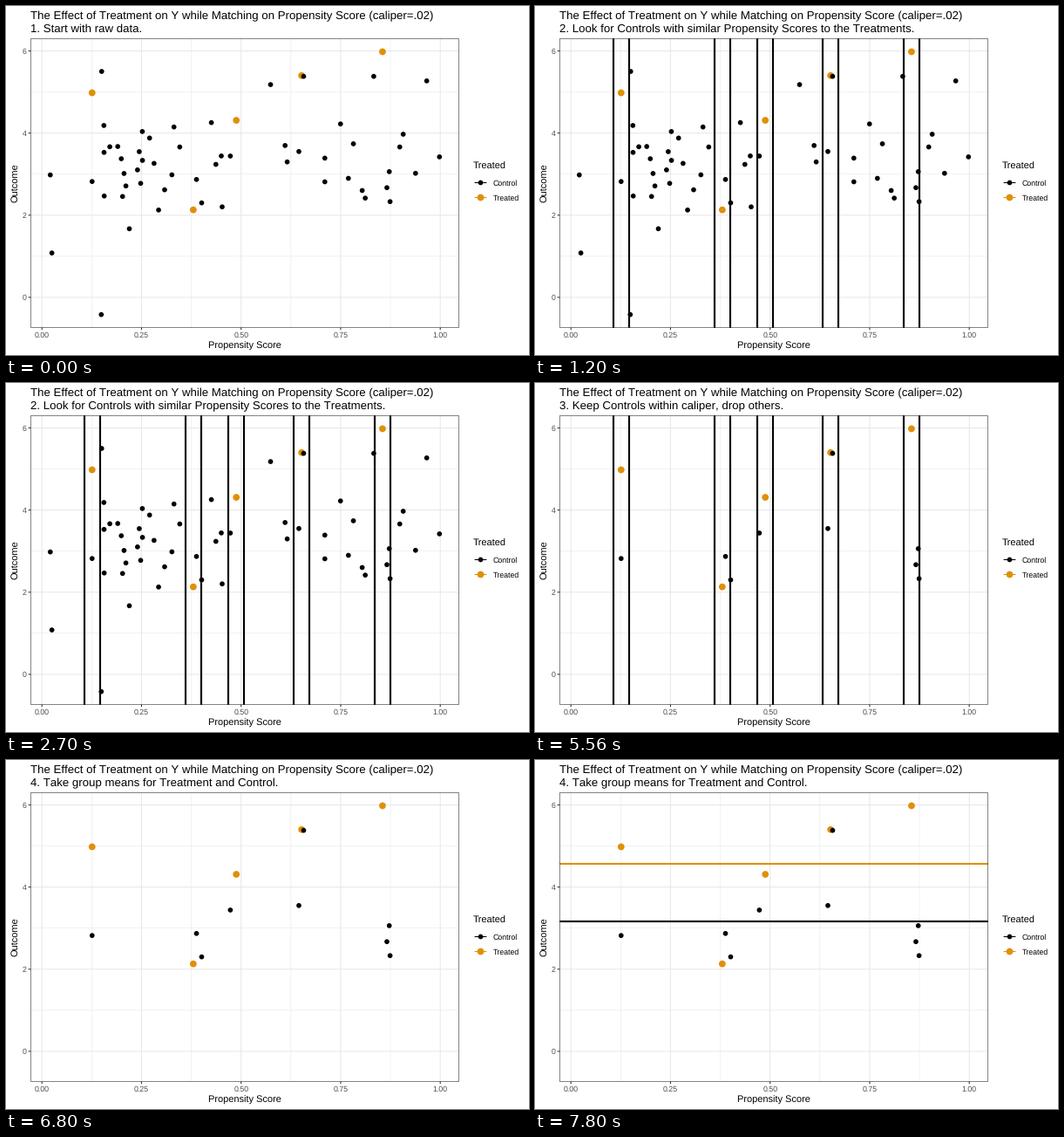
A matplotlib script that plays this animation: 600x400 px, repeating every 8000 ms.

```python
import math
import random

import matplotlib.pyplot as plt
from matplotlib.animation import FuncAnimation
from matplotlib.collections import PatchCollection
from matplotlib.patches import Circle

W, H, DPI = 600, 400, 100
PX = 72 / DPI                      # one pixel in points
STEP, LOOP = 100, 8000             # ms

LEFT, RIGHT, TOP, BOTTOM = 28.4, 519.6, 37.4, 368.5
X0, X_UNIT = 41.2, 457             # score 0 and one unit of score
Y0, Y_UNIT = 333.9, 47.07          # outcome 0 and one unit of outcome
CALIPER = 0.02

ORANGE, BLACK = "#e09008", "black"
GRID, FRAME, TICK_TEXT = "#e8e8e8", "#333333", "#4d4d4d"
THIN, THICK = 1.07, 2.13
R_CONTROL, R_TREATED = 2.84, 3.9

# (score, outcome)
TREATED = [(.126, 4.98), (.380, 2.13), (.488, 4.31), (.652, 5.40), (.855, 5.98)]
MATCHED = [(.126, 2.82), (.388, 2.87), (.401, 2.30), (.473, 3.44), (.645, 3.55),
           (.657, 5.38), (.866, 2.67), (.872, 3.06), (.874, 2.33)]
OUTLIERS = [(.021, 2.98), (.025, 1.08), (.149, -.42), (.150, 5.50), (.574, 5.18),
            (.833, 5.38), (.966, 5.27), (.998, 3.42)]
N_DROPPED = 46

TITLE = "The Effect of Treatment on Y while Matching on Propensity Score (caliper=.02)"
STEPS = [
    (0, "1. Start with raw data."),
    (500, "2. Look for Controls with similar Propensity Scores to the Treatments."),
    (3700, "3. Keep Controls within caliper, drop others."),
    (6800, "4. Take group means for Treatment and Control."),
]
CALIPERS_ON, DROP_AT, CALIPERS_OFF, MEANS_ON = 1200, 3700, 6800, 7800


def sx(score):
    return X0 + score * X_UNIT


def sy(outcome):
    return Y0 - outcome * Y_UNIT


def stage(points):
    return [(sx(s), sy(o)) for s, o in points]


def unmatched_controls(seed=4):
    """Outliers plus a cloud, denser at low scores, outside every caliper."""
    rng = random.Random(seed)
    points = list(OUTLIERS)
    while len(points) < N_DROPPED:
        score = 0.148 + 0.84 * rng.random() ** 1.5
        outcome = rng.gauss(2.8 + 0.6 * score, 0.75)
        in_caliper = any(abs(score - s) < CALIPER + 0.003 for s, _ in TREATED)
        crowded = any(math.dist(p, (sx(score), sy(outcome))) < 9
                      for p in stage(points))
        if 1.65 < outcome < 4.45 and not in_caliper and not crowded:
            points.append((score, outcome))
    return points


def mean_outcome(points):
    return sum(o for _, o in points) / len(points)


plt.rcParams.update({"font.family": "Liberation Sans", "text.hinting": "none",
                     "text.kerning_factor": 6, "toolbar": "None"})
fig = plt.figure(figsize=(W / DPI, H / DPI), dpi=DPI, facecolor="white")
ax = fig.add_axes([0, 0, 1, 1])
ax.set(xlim=(0, W), ylim=(H, 0))
ax.axis("off")


def line(xs, ys, color, width, z):
    return ax.plot(xs, ys, color=color, lw=width * PX, zorder=z,
                   snap=width == THICK, solid_capstyle="butt")[0]


def vline(x, color, width, z):
    return line((x, x), (TOP, BOTTOM), color, width, z)


def hline(y, color, width, z):
    return line((LEFT, RIGHT), (y, y), color, width, z)


def dots(centres, radius, color, z):
    circles = [Circle(c, radius) for c in centres]
    group = PatchCollection(circles, facecolor=color, edgecolor="none", zorder=z)
    return ax.add_collection(group)


def label(x, y, text, size, color=BLACK, **kw):
    return ax.text(x, y, text, fontsize=size * PX, color=color,
                   **{"va": "baseline", "ha": "left", **kw})


# Grid, ticks and tick labels
for i in range(4):
    vline(sx((i + 0.5) / 4), GRID, THIN / 2, 1)
for v in (1, 3, 5):
    hline(sy(v), GRID, THIN / 2, 1)
for i in range(5):
    x = sx(i / 4)
    vline(x, GRID, THIN, 1)
    line((x, x), (BOTTOM, BOTTOM + 2.75), FRAME, THIN, 2)
    label(x, 380.3, f"{i / 4:.2f}", 8.8, TICK_TEXT, ha="center")
for v in (0, 2, 4, 6):
    y = sy(v)
    hline(y, GRID, THIN, 1)
    line((LEFT - 2.75, LEFT), (y, y), FRAME, THIN, 2)
    label(23.4, y + 3.2, str(v), 8.8, TICK_TEXT, ha="right")

# Panel border
line((28.5, 519.5, 519.5, 28.5, 28.5), (37.5, 37.5, 368.5, 368.5, 37.5),
     FRAME, 0.6, 6)

# Titles
label(28.2, 15.4, TITLE, 13.2)
subtitle = label(28.2, 30, "", 13.2)
label(273.8, 393, "Propensity Score", 11, ha="center")
label(13.4, 203, "Outcome", 11, ha="center", rotation=90,
      rotation_mode="anchor")

# Legend
label(535.9, 187, "Treated", 11)
for y, name, color, radius in ((202.5, "Control", BLACK, R_CONTROL),
                               (219.5, "Treated", ORANGE, R_TREATED)):
    line((537.6, 551.4), (y, y), color, THIN, 2)
    dots([(544.5, y)], radius, color, 3)
    label(558.7, y + 3.4, name, 8.8)

# Data
dots(stage(TREATED), R_TREATED, ORANGE, 3)
dots(stage(MATCHED), R_CONTROL, BLACK, 4)
dropped = dots(stage(unmatched_controls()), R_CONTROL, BLACK, 4)
calipers = [vline(sx(s + side * CALIPER), BLACK, THICK, 5)
            for s, _ in TREATED for side in (-1, 1)]
means = [hline(sy(mean_outcome(TREATED)), ORANGE, THICK, 5),
         hline(sy(mean_outcome(MATCHED)), BLACK, THICK, 5)]


def update(frame):
    t = frame * STEP
    subtitle.set_text([text for start, text in STEPS if start <= t][-1])
    dropped.set_visible(t < DROP_AT)
    for artist in calipers:
        artist.set_visible(CALIPERS_ON <= t < CALIPERS_OFF)
    for artist in means:
        artist.set_visible(t >= MEANS_ON)
    return [subtitle, dropped, *calipers, *means]


anim = FuncAnimation(fig, update, frames=LOOP // STEP, interval=STEP,
                     init_func=lambda: update(0), repeat=True, repeat_delay=0)
plt.show()
```
